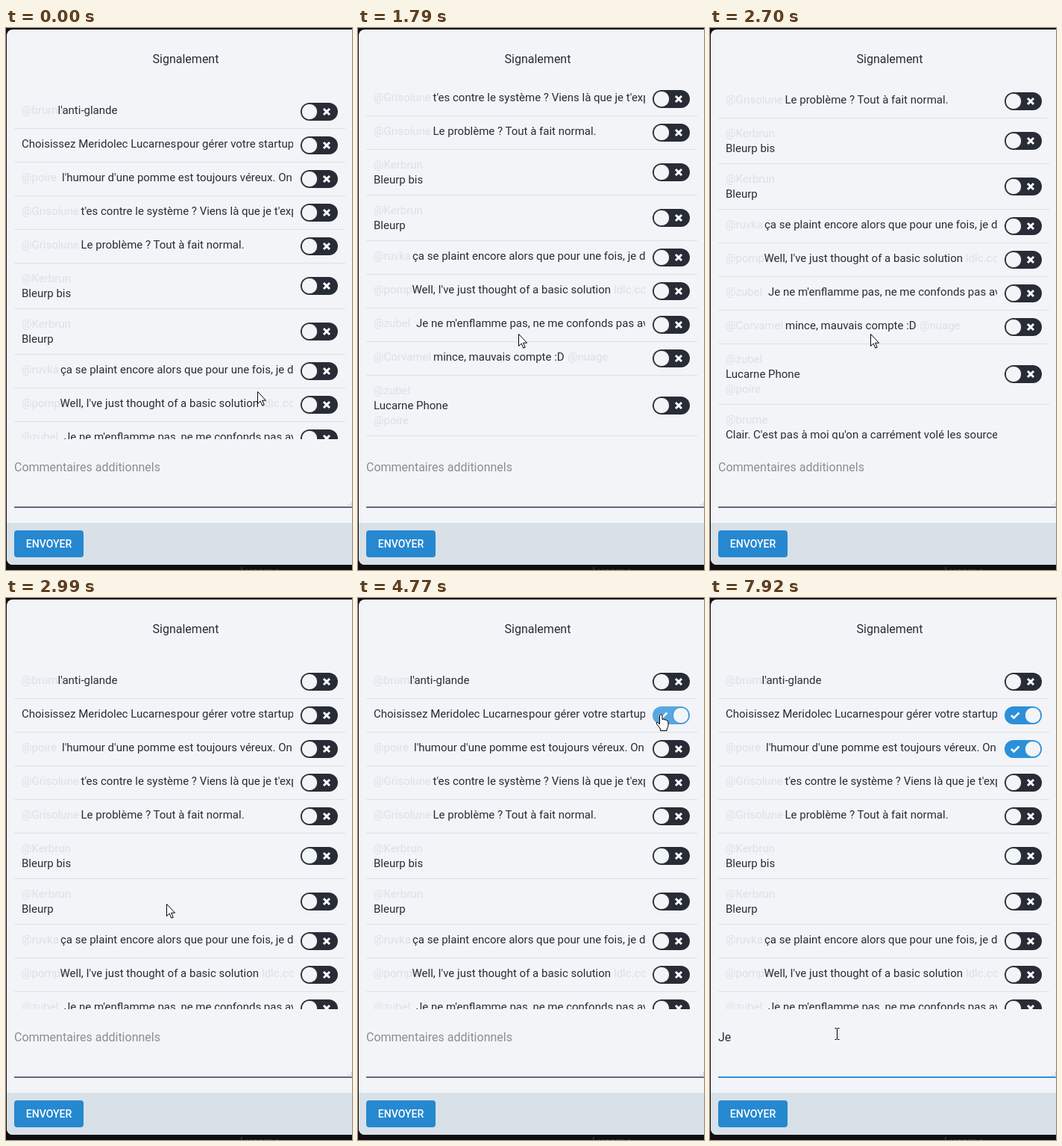
Recreate the animation shown at these times as an HTML page. Size 464 px wide and 725 px high, loop 7990 ms.

```html
<!DOCTYPE html>
<html lang="fr">
<head>
<meta charset="utf-8">
<title>Signalement</title>
<style>
html, body { margin: 0; width: 100%; height: 100%; overflow: hidden; background: #0e0f12; }
svg { display: block; overflow: hidden; }
text { font: 16px Roboto, sans-serif; fill: #282c37; white-space: pre; }
.status { font-size: 15px; }
.faint { fill: #d9e1e8; }
</style>
</head>
<body>
<svg id="stage" width="464" height="725" viewBox="0 0 464 725">
  <text class="status" x="314" y="732" style="fill:#3c3e42">Lucarne</text>
  <rect x="1" y="2" width="480" height="716" rx="8" fill="#f2f4f7"/>
  <path d="M1 662H464V718H9a8 8 0 0 1-8-8z" fill="#d9e1e8"/>
  <text x="241" y="47" text-anchor="middle">Signalement</text>
  <svg x="0" y="80" width="385" height="470" viewBox="0 80 385 470"><g id="texts"></g></svg>
  <svg x="11" y="80" width="444" height="470" viewBox="11 80 444 470"><g id="marks"></g></svg>
  <text id="note" x="11" y="593"></text>
  <path d="M11 641H464" stroke="#606984" stroke-width="2"/>
  <path id="underline" d="M11 641H464" stroke="#2b90d9" stroke-width="2"/>
  <path d="M459 638h1.5m2 0h1.5m-1.5-3h1.5" stroke="#aaa"/>
  <rect x="11" y="672" width="93" height="36" rx="4" fill="#2588d0"/>
  <text x="57.5" y="695" text-anchor="middle" style="font-size:14px;font-weight:500;fill:#fff">ENVOYER</text>
  <path id="cursor"/>
</svg>
<script>
const LOOP = 7990, MAX_SCROLL = 269;
const $ = id => document.getElementById(id);

// Each row is a list of lines; a line lists [x, text] parts, "@" and "~" parts are faint.
const rows = [
  [[[21, '@brume'], [69.5, "l'anti-glande"]]],
  [[[21, 'Choisissez Meridolec Lucarnes'], [229, 'pour gérer votre startup']]],
  [[[21, '@poire'], [75, "l'humour d'une pomme est toujours véreux. On"]]],
  [[[21, '@Grisolune'], [100.5, "t'es contre le système ? Viens là que je t'explique"]]],
  [[[21, '@Grisolune'], [100.5, 'Le problème ? Tout à fait normal.']]],
  [[[21, '@Kerbrun']], [[21, 'Bleurp bis']]],
  [[[21, '@Kerbrun']], [[21, 'Bleurp']]],
  [[[21, '@ruvka'], [73, 'ça se plaint encore alors que pour une fois, je dis']]],
  [[[21, '@pompon'], [72.5, "Well, I've just thought of a basic solution"], [343, '~ldlc.com']]],
  [[[21, '@zubel'], [78, "Je ne m'enflamme pas, ne me confonds pas avec"]]],
  [[[21, '@Corvamel'], [101, 'mince, mauvais compte :D'], [281, '@nuage']]],
  [[[21, '@zubel']], [[21, 'Lucarne Phone']], [[21, '@poire']]],
  [[[21, '@brume']], [[21, "Clair. C'est pas à moi qu'on a carrément volé les sources"]], [[21, '@zubel']], [], []]
];

let rowTop = 90, textHtml = '';
const boxes = rows.map(lines => {
  lines.forEach((line, i) => line.forEach(([x, s]) => {
    const faint = /^[@~]/.test(s) ? ' faint' : '';
    textHtml += `<text class="status${faint}" x="${x}" y="${rowTop + 25 + 20 * i}">${s.replace('~', '')}</text>`;
  }));
  const height = Math.max(45, 21 + 20 * lines.length);
  const box = { mid: rowTop + Math.floor(height / 2), end: rowTop + height - 0.5 };
  rowTop += height;
  return box;
});
$('texts').innerHTML = textHtml;

// Progress in n equal jumps, the first at `from` and the last at `to`.
const jump = (t, from, to, n) =>
  Math.max(0, Math.min(n, Math.floor((t - from) / (to - from) * (n - 1) + 0.1) + 1)) / n;

// Moves: start, end, jumps, target x, target y
const moves = [
  [680, 1030, 6, 215, 409], [3060, 3200, 3, 310, 219], [3350, 3770, 7, 431, 195],
  [3910, 4400, 8, 406, 155], [5220, 5430, 4, 406, 200], [5650, 5860, 4, 406, 203],
  [6740, 7170, 7, 170, 578], [7400, 7620, 4, 170, 583]
];
const pointer = t => moves.reduce(([x, y], [from, to, n, tx, ty]) => {
  const p = jump(t, from, to, n);
  return [x + (tx - x) * p, y + (ty - y) * p];
}, [337, 486]);

const shapes = {
  arrow: 'M.5.5v16l3.7-3.5 2.6 6.2 2.4-1-2.6-6h5z',
  hand: 'M-1.5 14V2q1.8-2.8 3.5 0v5.5q2-1.4 3.2.5 2-1 3 1 1.8-.4 1.8 2V15q0 3-1.8 5v2.5H-.5V20l-5-6.5q-.8-2.6 1.5-2z',
  beam: 'M-3-7.5h2l1 .7 1-.7h2M0-7V7M-3 7.5h2l1-.7 1 .7h2'
};

function toggle(y, p, hover) {
  const color = p ? (hover ? '#56a7e1' : '#2b90d9') : (hover ? '#131419' : '#282c37');
  return `<rect x="395" y="${y - 12}" width="50" height="24" rx="12" fill="${color}"/>
    <g fill="none" stroke="#fff">
      <path d="M404 ${y}l3.5 3.5 7-7" stroke-width="2.6" opacity="${p}"/>
      <path d="M426 ${y - 4}l8 8m0-8l-8 8" stroke-width="3" opacity="${1 - p}"/>
    </g>
    <circle cx="${407 + 26 * p}" cy="${y}" r="10.7" fill="#f2f5f7" stroke="${p ? '#2b90d9' : '#282c37'}"/>`;
}

function draw(t) {
  const down = 1 - (1 - jump(t, 1570, 2090, 8)) ** 1.2;
  const up = jump(t, 2550, 2990, 7) ** 1.5;
  const scroll = Math.round(MAX_SCROLL * (down - up));
  for (const id of ['texts', 'marks']) $(id).setAttribute('transform', `translate(0 ${-scroll})`);

  const [x, y] = pointer(t).map(Math.round);
  const slides = { 1: jump(t, 4480, 4770, 5), 2: jump(t, 6010, 6220, 4) };
  let hovering = false;
  $('marks').innerHTML = boxes.map(({ mid, end }, i) => {
    const hover = x >= 395 && x <= 445 && Math.abs(y + scroll - mid) <= 12;
    hovering = hovering || hover;
    return `<path d="M11 ${end}H455" stroke="#d9e1e8"/>` + toggle(mid, slides[i] || 0, hover);
  }).join('');

  const kind = hovering ? 'hand' : y > 565 ? 'beam' : 'arrow';
  const cursor = $('cursor');
  cursor.setAttribute('d', shapes[kind]);
  cursor.setAttribute('transform', `translate(${x + (kind === 'beam' ? 0.5 : 0)} ${y})`);
  cursor.setAttribute('fill', kind === 'beam' ? 'none' : '#fff');
  cursor.setAttribute('stroke', '#000');

  $('underline').setAttribute('opacity', jump(t, 7400, 7620, 4));
  const typed = 'Je'.slice(0, t < 7770 ? 0 : t < 7850 ? 1 : 2);
  $('note').textContent = typed || 'Commentaires additionnels';
  $('note').style.fill = typed ? '#282c37' : '#8c8d90';
}

const start = performance.now();
(function frame() {
  draw((performance.now() - start) % LOOP);
  requestAnimationFrame(frame);
})();
</script>
</body>
</html>
```
